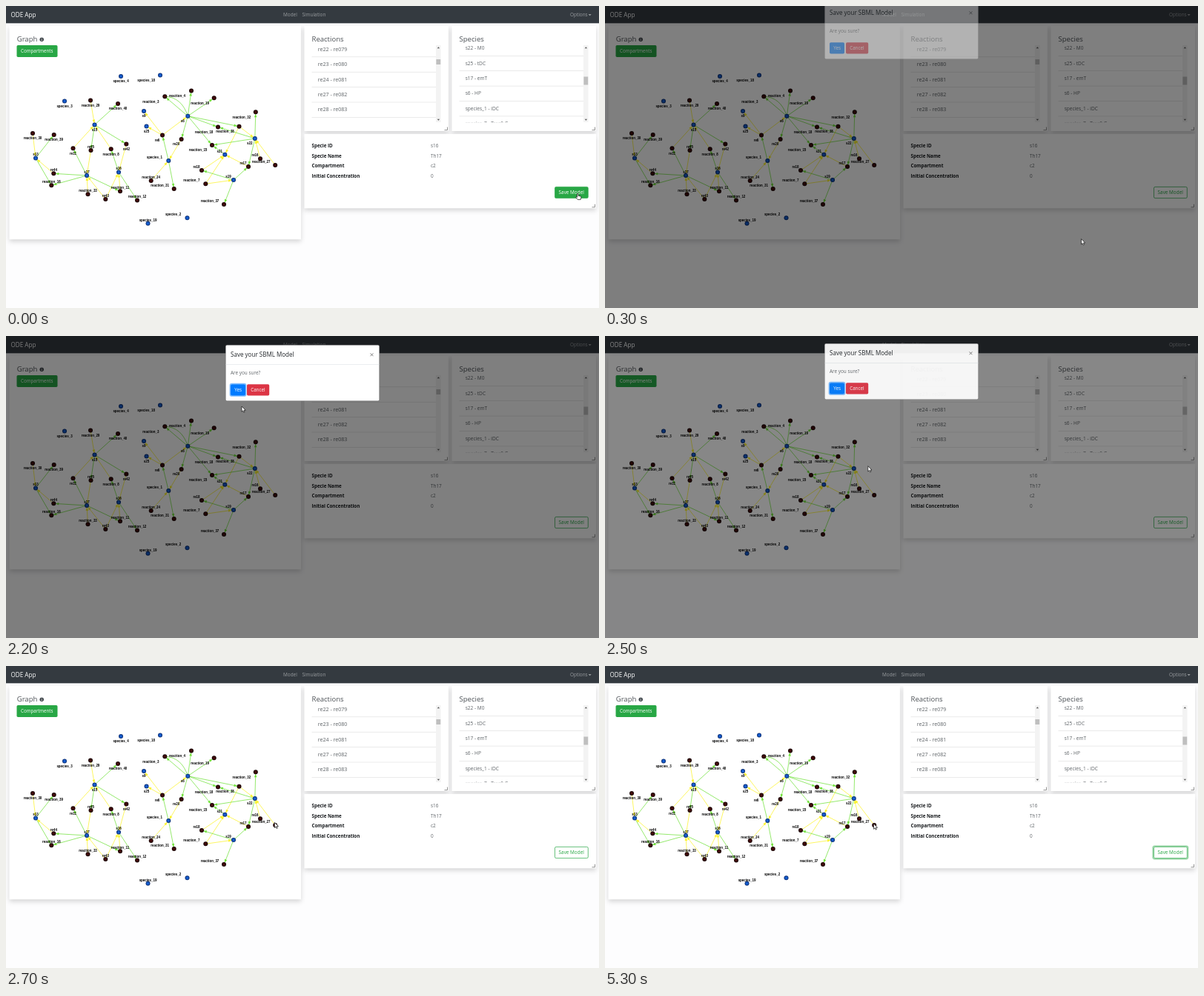
Recreate the animation shown at these times as an HTML page. Size 800 by 408 pixels, loop 5500 ms.

```html
<!DOCTYPE html>
<html lang="en">
<head>
<meta charset="utf-8">
<title>ODE App</title>
<style>
  html, body { margin: 0; width: 100%; height: 100%; overflow: hidden; background: #fdfdfe; }
  svg { display: block; width: 100vw; height: 100vh; }
  text { font: 6.4px "Open Sans", "Noto Sans", sans-serif; fill: #5f6468; white-space: pre; }
  .title { font-size: 9.55px; font-weight: 500; fill: #4c5156; }
  .brand { font-size: 8.1px; fill: #fff; }
  .nav { fill: #999c9f; }
  .key { font-size: 6.25px; font-weight: 700; fill: #16191c; }
  .white { fill: #fff; }
  .node { font: bold 4.45px "Liberation Sans", Arial, sans-serif; fill: #000; text-anchor: middle; }
  .toast { font: 6.67px "Liberation Sans", Arial, sans-serif; fill: #fff; }
  .heading { font-size: 8.05px; font-weight: 500; fill: #212529; }
  .panel { fill: #fff; filter: drop-shadow(0 3px 3px rgba(0, 0, 0, .16)); }
</style>
</head>
<body>
<svg id="stage" viewBox="0 0 800 408">
  <defs>
    <clipPath id="listClip"><rect x="400" y="53" width="400" height="104.3"/></clipPath>
    <radialGradient id="species"><stop offset=".35" stop-color="#1560d4"/><stop offset="1" stop-color="#08276a"/></radialGradient>
    <radialGradient id="reaction"><stop offset=".2" stop-color="#4c0b0b"/><stop offset="1" stop-color="#120202"/></radialGradient>
  </defs>
  <rect width="800" height="408" fill="#fdfdfe"/>
  <g id="page"></g>
  <rect id="backdrop" width="800" height="408"/>
  <g id="modal"></g>
  <g id="toast"></g>
  <g id="arrow"><path d="M0 0V7.3L1.7 5.8 2.8 8.2 4 7.7 3 5.3H5.2Z" fill="#fff" stroke="#111" stroke-width=".7"/></g>
  <g id="hand"><path d="M0 .7Q.8-.4 1.6.7V3.4L4.4 3.9Q5.6 4.2 5.4 5.6L4.7 8.6H.8L-1.8 5.6Q-1.8 4.6-.8 4.8L0 5.4Z" fill="#fff" stroke="#111" stroke-width=".7"/></g>
</svg>
<script>
const $ = id => document.getElementById(id);
const page = $('page'), modal = $('modal'), toast = $('toast');

function add(parent, tag, attrs, content) {
  const el = document.createElementNS(parent.namespaceURI, tag);
  for (const key in attrs) el.setAttribute(key, attrs[key]);
  if (content) el.textContent = content;
  return parent.appendChild(el);
}
const rect = (parent, x, y, width, height, attrs) => add(parent, 'rect', { x, y, width, height, ...attrs });
const text = (parent, x, y, content, cls = '', attrs) => add(parent, 'text', { x, y, class: cls, ...attrs }, content);
const path = (parent, d, attrs) => add(parent, 'path', { d, ...attrs });
const cross = (parent, x, y, r, attrs) =>
  path(parent, `M${x - r} ${y - r}l${2 * r} ${2 * r}m0 ${-2 * r}l${-2 * r} ${2 * r}`, attrs);

function drawNavbar() {
  rect(page, 0, 0, 800, 23.3, { fill: '#343a40' });
  text(page, 6.5, 15, 'ODE App', 'brand');
  text(page, 374, 14.3, 'Model', 'nav');
  text(page, 399.5, 14.3, 'Simulation', 'nav');
  text(page, 761, 14.3, 'Options', 'nav');
  path(page, 'M785.7 11h4l-2 2.2z', { fill: '#999c9f' });
}

function drawPanels() {
  for (const [x, y, w, h] of [[4.5, 27, 393.5, 288.3], [402.5, 27, 194.5, 142], [601.5, 27, 194.5, 142], [402.5, 173, 393.5, 100.3]])
    rect(page, x, y, w, h, { class: 'panel' });
  for (const [x, y] of [[595.5, 167.6], [794.5, 167.6], [794.5, 271.8]])
    path(page, `M${x - 4} ${y}h4v-4`, { fill: 'none', stroke: '#777', 'stroke-width': .8 });
}

function drawList(title, x, firstY, rows, size, thumbY, thumbH) {
  text(page, x, 48, title, 'title');
  const list = add(page, 'g', { 'clip-path': 'url(#listClip)' });
  rows.forEach((row, i) => {
    const y = firstY + i * 20.4;
    text(list, x + 8.2, y + 2.2, row, '', { style: `font-size:${size}px` });
    rect(list, x, y + 10, 167.5, .6, { fill: '#dcdcdc' });
  });
  const bar = x + 167.5;
  rect(page, bar, 53, 6.6, 104, { fill: '#f3f3f3' });
  rect(page, bar + .4, thumbY, 5.8, thumbH, { fill: '#bfbfbf' });
  path(page, `M${bar + 1.7} 57.3h3.4l-1.7-2zM${bar + 1.7} 152.7h3.4l-1.7 2z`, { fill: '#555' });
}

const speciesNodes = {
  species_4: [155, 95], species_18: [208, 93.5], species_3: [79, 128.5], s15: [119.5, 160.5], s13: [40, 205.5],
  s9: [186, 142], s25: [189.5, 162.5], s6: [245.3, 148.7], s22: [335.8, 179], s21: [295.3, 200.7], s19: [307, 235],
  species_1: [219.3, 209], s17: [109, 229], s16: [152, 224.5], species_2: [244.5, 286.3], species_19: [191.5, 293.8]
};
const reactionNodes = {
  reaction_29: [114, 127.5], reaction_40: [151, 132], reaction_30: [36, 172], reaction_39: [64.7, 174],
  re11: [90.5, 192.3], re45: [114.5, 195], reaction_8: [141.7, 193.2], re42: [162.3, 186.4], re44: [64.3, 226.3],
  reaction_16: [61.3, 242.3], reaction_33: [110.5, 254.3], re43: [134.3, 261], reaction_11: [154, 250.3],
  reaction_12: [177, 262.5], reaction_3: [214.3, 122.3], reaction_4: [250, 114.5], reaction_19: [280.7, 124.3],
  re6: [211, 174.5], re20: [236.6, 180], reaction_18: [286, 163.5], reaction_38: [314.5, 162.7],
  reaction_32: [336.8, 143.3], reaction_15: [278, 188], re18: [264, 222], re17: [327, 217], re16: [343, 206.3],
  reaction_27: [363.2, 215], reaction_7: [269.3, 240.3], reaction_37: [294, 268], reaction_24: [195.7, 236],
  reaction_31: [226.7, 247]
};
const greenLinks = {
  s15: 'reaction_40 re45 re42', s13: 'reaction_39 reaction_16', s17: 're44 reaction_16 re11 reaction_11',
  s16: 'reaction_8 reaction_12', s6: 'reaction_3 reaction_4 reaction_19 re20 reaction_18 reaction_38 reaction_15',
  species_1: 're6 reaction_31', s22: 'reaction_18 reaction_32 reaction_15 re17', s21: 'reaction_15',
  s19: 're18 re17 reaction_37'
};
const yellowLinks = {
  s15: 'reaction_29 re11 reaction_8', s13: 'reaction_30 re44', s17: 're45 reaction_33 re43',
  s16: 're42 reaction_11 re43', s6: 're6', s9: 're6', s25: 're6', species_1: 're20 reaction_24',
  s22: 'reaction_38 re16 reaction_27', s21: 'reaction_38 re18 re17 reaction_7', s19: 'reaction_7'
};

function drawLink([x1, y1], [x2, y2], color) {
  const angle = Math.atan2(y2 - y1, x2 - x1);
  const along = (back, side) =>
    `${x2 - back * Math.cos(angle) + side * Math.sin(angle)} ${y2 - back * Math.sin(angle) - side * Math.cos(angle)}`;
  path(page, `M${x1} ${y1}L${x2} ${y2}`, { stroke: color, 'stroke-width': .75 });
  path(page, `M${along(2.6, 0)}L${along(7, 1.8)}L${along(7, -1.8)}Z`, { fill: color });
}

// Labels sit below upper nodes and above lower ones; on the right side they shift left.
function drawNodes(nodes, fill) {
  for (const [name, [x, y]] of Object.entries(nodes)) {
    add(page, 'circle', { cx: x, cy: y, r: 3, fill: `url(#${fill})` });
    const shift = x < 200 ? 0 : name.length > 6 ? -19 : -7;
    text(page, x + shift, y + (y < 194 ? 8.4 : -3.1), name, 'node');
  }
}

function drawGraph() {
  text(page, 14.7, 48, 'Graph', 'title');
  add(page, 'circle', { cx: 48.2, cy: 45.3, r: 2.7, fill: '#40464b' });
  path(page, 'M48.2 43.4v.9m0 .7v2', { stroke: '#fff', 'stroke-width': .8 });
  rect(page, 14.5, 53, 55, 16, { rx: 1.7, fill: '#28a745' });
  text(page, 20, 63.4, 'Compartments', 'white', { style: 'font-size:6.2px' });
  for (const [s, list] of Object.entries(yellowLinks))
    for (const r of list.split(' ')) drawLink(reactionNodes[r], speciesNodes[s], '#fcf32c');
  for (const [s, list] of Object.entries(greenLinks))
    for (const r of list.split(' ')) drawLink(speciesNodes[s], reactionNodes[r], '#72e23c');
  path(page, 'M214.3 122.3Q237 123 245.3 148.7', { fill: 'none', stroke: '#72e23c', 'stroke-width': .75 });
  drawNodes(speciesNodes, 'species');
  drawNodes(reactionNodes, 'reaction');
}

function drawDetails() {
  [['Specie ID', 's16'], ['Specie Name', 'Th17'], ['Compartment', 'c2'], ['Initial Concentration', '0']]
    .forEach(([key, value], i) => {
      const y = 191.3 + i * 13.4;
      text(page, 412.5, y, key, 'key');
      text(page, 573, y, value);
    });
}

drawNavbar();
drawPanels();
drawGraph();
drawList('Reactions', 412.5, 58.5,
  ['re22 - re079', 're23 - re080', 're24 - re081', 're27 - re082', 're28 - re083'], 7.1, 72, 7);
drawList('Species', 611.5, 57,
  ['s22 - M0', 's25 - tDC', 's17 - emT', 's6 - HP', 'species_1 - iDC', 'species_7 - Treg0 G'], 6.55, 95.5, 11);
drawDetails();

const saveRing = rect(page, 739.2, 243.3, 47.3, 17.4, { rx: 2.4, fill: 'none', stroke: '#28a745', 'stroke-opacity': .5, 'stroke-width': 1.5 });
const saveButton = rect(page, 740.5, 244.4, 44.8, 15.2, { rx: 1.7, stroke: '#28a745', 'stroke-width': .7 });
const saveLabel = text(page, 745.6, 254.3, 'Save Model');

rect(modal, 296.3, 12.2, 207.4, 75.5, { rx: 1.8, fill: '#fff', stroke: '#555', 'stroke-width': .4 });
text(modal, 303, 28.4, 'Save your SBML Model', 'heading');
cross(modal, 493.5, 25.3, 1.9, { stroke: '#7a7a7a', 'stroke-width': 1 });
rect(modal, 296.5, 38.1, 207, .6, { fill: '#dee2e6' });
text(modal, 303, 52.3, 'Are you sure?');
const yesRing = rect(modal, 302.3, 64.5, 21.4, 16.6, { rx: 2.4, fill: 'none', stroke: '#80bdff', 'stroke-width': 1.5 });
const yesButton = rect(modal, 303, 65.2, 20, 15.3, { rx: 1.7 });
text(modal, 308.2, 75.3, 'Yes', 'white');
rect(modal, 325, 65.2, 30.2, 15.3, { rx: 1.7, fill: '#dc3545' });
text(modal, 330.2, 75.3, 'Cancel', 'white', { style: 'font-size:6.25px' });

rect(toast, 661.5, 366.4, 130.5, 26.8, { rx: .4, fill: '#07bc0c' });
text(toast, 664.8, 382, 'Successfully saved', 'toast');
cross(toast, 786, 373.8, 1.7, { stroke: '#d8f5d9', 'stroke-width': 1 });
const progress = rect(toast, 661.5, 391.1, 130.5, 2.1, { fill: '#fff', opacity: .75 });

// Each track is a list of [time, value, ...], linear between entries.
const tracks = {
  backdrop: [[0, 0], [100, .1], [200, .4], [300, .5], [2400, .5], [2500, .47], [2600, .22], [2700, 0]],
  modal: [[0, 0, -21], [200, 0, -21], [300, .4, -16], [400, 1, -5.5], [500, 1, -1], [600, 1, 0],
    [2400, 1, 0], [2500, .93, -2], [2600, .4, -11], [2700, 0, -21]],
  cursor: [[0, 770.5, 253], [100, 752, 263], [300, 642.5, 314.7], [600, 575, 267], [800, 460, 170], [1000, 350, 100],
    [1200, 308, 78], [1400, 306.5, 77.2], [2000, 306.5, 77.2], [2200, 318, 95], [2500, 354.8, 175.7],
    [2700, 362.3, 211.3], [3800, 362.3, 211.3], [3900, 362.4, 213]],
  ring: [[2700, 0], [2800, .7], [2900, 1]],
  toastExit: [[4400, 0, 1], [4500, -7, 1], [4600, 8, 1], [4700, 45, .95], [4800, 85.5, .9], [5100, 85.5, .9],
    [5200, 115, .7], [5300, 140, 0]]
};

function at(track, t) {
  const next = track.findIndex(key => key[0] > t);
  if (next === 0) return track[0].slice(1);
  if (next < 0) return track[track.length - 1].slice(1);
  const a = track[next - 1], b = track[next], k = (t - a[0]) / (b[0] - a[0]);
  return a.slice(1).map((v, i) => v + (b[i + 1] - v) * k);
}

function bounceIn(t) {
  const stops = [[0, 1250], [.6, -10], [.75, 4], [.9, -2], [1, 0]];
  const p = Math.min(Math.max((t - 2700) / 700, 0), 1);
  const i = Math.max(1, stops.findIndex(stop => stop[0] >= p));
  const [p0, x0] = stops[i - 1], [p1, x1] = stops[i];
  return x1 + (x0 - x1) * (1 - (p - p0) / (p1 - p0)) ** 3;
}

const move = (el, x, y) => el.setAttribute('transform', `translate(${x} ${y})`);
const show = (el, on) => el.setAttribute('visibility', on ? 'visible' : 'hidden');

function render(t) {
  $('backdrop').setAttribute('opacity', at(tracks.backdrop, t)[0]);

  const [modalAlpha, modalY] = at(tracks.modal, t);
  modal.setAttribute('opacity', modalAlpha);
  move(modal, 0, modalY);
  const overYes = t >= 1200 && t < 2200;
  yesButton.setAttribute('fill', overYes ? '#0069d9' : '#007bff');
  show(yesRing, t >= 1900);

  const overSave = t < 200;
  saveButton.setAttribute('fill', overSave ? '#28a745' : '#fff');
  saveLabel.style.fill = overSave ? '#fff' : '#28a745';
  saveRing.setAttribute('opacity', at(tracks.ring, t)[0]);

  const [exitX, toastAlpha] = at(tracks.toastExit, t);
  move(toast, bounceIn(t) + exitX, 0);
  toast.setAttribute('opacity', toastAlpha);
  progress.setAttribute('width', 130.5 * Math.min(Math.max(1 - (t - 3260) / 1000, 0), 1));

  const [x, y] = at(tracks.cursor, t);
  const pointing = overSave || overYes;
  move($('arrow'), x, y);
  move($('hand'), x, y);
  show($('arrow'), !pointing);
  show($('hand'), pointing);
}

const start = performance.now();
function tick() {
  const t = (performance.now() - start) % 5500;
  render(Math.floor(t / 100) * 100);
  requestAnimationFrame(tick);
}
tick();
</script>
</body>
</html>
```
